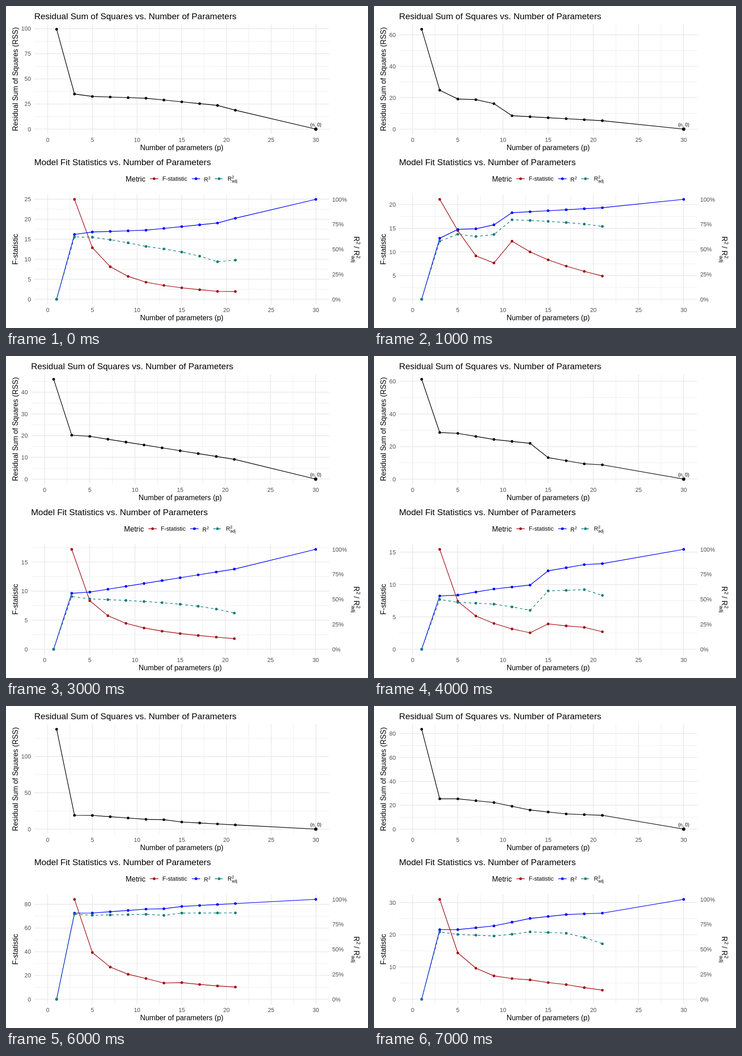
Write an HTML page with a canvas that moves like this. It is 794x706 px and loops after 8 s.

```html
<!DOCTYPE html>
<html lang="en">
<head>
<meta charset="utf-8">
<title>Model fit against number of parameters</title>
<style>
html, body { margin: 0; width: 100%; height: 100%; overflow: hidden; background: #fff; }
canvas { display: block; }
</style>
</head>
<body>
<canvas id="stage" width="794" height="706"></canvas>
<script>
const ctx = document.getElementById("stage").getContext("2d");
const RED = "#a10f14", BLUE = "#0000ff", TEAL = "#127c7c", GREY = "#4d4d4d", GRID = "#e6e6e6";
const TITLE = 19.06, BODY = 15.88, SMALL = 12.7;
const LINE = 1.41, DASH = [4 * LINE, 4 * LINE];
const N = 30, RIGHT = 709, HEIGHT = 219, HOLD = 1000;
const RSS_ZERO = 269.9, FIT_ZERO = 642.9;

// Each run: RSS of the empty model, F at p = 3, and the bends of the R² curve by p.
const runs = [
  { rss: 99.5, f: 24.95, bends: { 5: .673, 11: .691, 19: .763, 21: .811 } },
  { rss: 63.6, f: 21.13, bends: { 5: .699, 7: .705, 9: .745, 11: .866, 21: .916 } },
  { rss: 33.55, f: 13.51, bends: { 5: .504, 7: .579, 15: .636, 19: .692, 21: .828 } },
  { rss: 46, f: 17.2, bends: { 5: .572, 21: .802 } },
  { rss: 61.3, f: 15.43, bends: { 5: .542, 9: .603, 13: .642, 15: .785, 19: .847, 21: .857 } },
  { rss: 103.5, f: 42, bends: { 5: .764, 21: .885 } },
  { rss: 137.6, f: 84.2, bends: { 5: .863, 11: .902, 13: .906, 15: .929, 21: .958 } },
  { rss: 83.7, f: 31, bends: { 5: .697, 9: .734, 13: .809, 17: .848, 21: .862 } },
];

// Models p = 1, 3, ... 21, with R² linear between bends; R² at p = 3 follows from F.
function fitModels({ f, bends }) {
  const keys = Object.entries({ 1: 0, 3: f / (f + (N - 3) / 2), ...bends });
  const models = [];
  for (let p = 1; p <= 21; p += 2) {
    const i = Math.max(1, keys.findIndex(([key]) => key >= p));
    const [[p0, r0], [p1, r1]] = [keys[i - 1], keys[i]];
    models.push({ p, r: r0 + (r1 - r0) * (p - p0) / (p1 - p0) });
  }
  return models;
}

const fStatistic = ({ p, r }) => r / (p - 1) / ((1 - r) / (N - p));
const adjustedR2 = ({ p, r }) => 1 - (1 - r) * (N - 1) / (N - p);

// The round step that comes closest to the usual number of intervals
function gridStep(max) {
  const misfit = step => Math.abs(Math.log(max / step / 3.8));
  return [2, 2.5, 5, 10, 20, 25, 50].reduce((a, b) => misfit(b) < misfit(a) ? b : a);
}

function text(str, x, y, size, { color = "#000", align = "left", angle = 0 } = {}) {
  ctx.save();
  ctx.translate(x, y);
  ctx.rotate(angle);
  ctx.font = size + 'px "Liberation Sans", Arial, sans-serif';
  ctx.fontKerning = "none";
  ctx.textAlign = align;
  ctx.fillStyle = color;
  ctx.fillText(str, 0, 0);
  ctx.restore();
}

function polyline(points, color, width = LINE, dash = []) {
  ctx.beginPath();
  points.forEach(([x, y]) => ctx.lineTo(x, y));
  ctx.strokeStyle = color;
  ctx.lineWidth = width;
  ctx.setLineDash(dash);
  ctx.stroke();
}

function dot(x, y, color, radius = 2.9) {
  ctx.beginPath();
  ctx.arc(x, y, radius, 0, 2 * Math.PI);
  ctx.fillStyle = color;
  ctx.fill();
}

function series(points, color, dash) {
  polyline(points, color, LINE, dash);
  points.forEach(([x, y]) => dot(x, y, color));
}

// R with a raised 2 and, optionally, a lowered "adj"
function rSquared(x, y, size, adjusted) {
  const after = x + size * 0.735;
  text("R", x, y, size);
  text("2", after, y - size * 0.39, size * 0.7);
  if (adjusted) text("adj", after, y + size * 0.29, size * 0.7);
}

function panel(left, zero, max, xAt, title, titleY, yTitle) {
  const top = zero - 1.05 * HEIGHT, bottom = zero + 0.05 * HEIGHT;
  const step = gridStep(max);
  const yAt = v => zero - v / max * HEIGHT;
  for (const minor of [true, false]) {
    const width = minor ? LINE / 2 : LINE;
    for (let v = minor ? step / 2 : 0; yAt(v) >= top; v += step) {
      polyline([[left, yAt(v)], [RIGHT, yAt(v)]], GRID, width);
      if (!minor) text(v, left - 7.3, yAt(v) + 4.6, SMALL, { color: GREY, align: "right" });
    }
    for (let p = minor ? 2.5 : 0; p <= N; p += 5) {
      polyline([[xAt(p), top], [xAt(p), bottom]], GRID, width);
      if (!minor) text(p, xAt(p), zero + 27.6, SMALL, { color: GREY, align: "center" });
    }
  }
  text(title, left, titleY, TITLE);
  text("Number of parameters (p)", (left + RIGHT) / 2, zero + 45.7, BODY, { align: "center" });
  text(yTitle, 26, zero - HEIGHT / 2, BODY, { align: "center", angle: -Math.PI / 2 });
}

function legend(shift) {
  ctx.save();
  ctx.translate(shift, 0);
  text("Metric", 262.6, 385, BODY);
  [[325, RED], [416.8, BLUE], [467.3, TEAL, DASH]].forEach(([x, color, dash]) => {
    polyline([[x - 9.2, 378.7], [x + 9.2, 378.7]], color, LINE, dash);
    dot(x, 378.7, color);
  });
  text("F-statistic", 343, 383.3, SMALL);
  rSquared(434.3, 385, SMALL);
  rSquared(486, 383, SMALL, true);
  ctx.restore();
}

function rightAxis() {
  for (let i = 0; i <= 4; i++)
    text(i * 25 + "%", 715.5, FIT_ZERO - i * HEIGHT / 4 + 4.6, SMALL, { color: GREY });
  ctx.save();
  ctx.translate(763, 505);
  ctx.rotate(Math.PI / 2);
  rSquared(0, 0, BODY);
  text("/", 22.1, 0, BODY);
  rSquared(30.9, 0, BODY, true);
  ctx.restore();
}

function draw(run) {
  const left = run.rss * 1.05 >= 100 ? 62 : 55; // room for three-digit labels
  const xAt = p => left + (p + 1.5) * (RIGHT - left) / 33;
  const models = fitModels(run);
  const all = [...models, { p: N, r: 1 }];
  const plot = (list, zero, value) => list.map(m => [xAt(m.p), zero - value(m) * HEIGHT]);

  ctx.fillStyle = "#fff";
  ctx.fillRect(0, 0, 794, 706);

  panel(left, RSS_ZERO, run.rss, xAt,
    "Residual Sum of Squares vs. Number of Parameters", 28.6, "Residual Sum of Squares (RSS)");
  series(plot(all, RSS_ZERO, m => 1 - m.r), "#000");
  dot(xAt(N), RSS_ZERO, "#000", 3.6);
  text("(n, 0)", xAt(N), 264.3, 10.4, { align: "center" });

  panel(left, FIT_ZERO, run.f, xAt,
    "Model Fit Statistics vs. Number of Parameters", 348.6, "F-statistic");
  series(plot(models.slice(1), FIT_ZERO, m => fStatistic(m) / run.f), RED);
  series(plot(all, FIT_ZERO, m => m.r), BLUE);
  series(plot(models, FIT_ZERO, adjustedR2), TEAL, DASH);
  legend((left - 62) / 2);
  rightAxis();
}

const start = performance.now();
function tick() {
  const elapsed = performance.now() - start;
  draw(runs[Math.floor(elapsed / HOLD) % runs.length]);
  requestAnimationFrame(tick);
}
tick();
</script>
</body>
</html>
```
